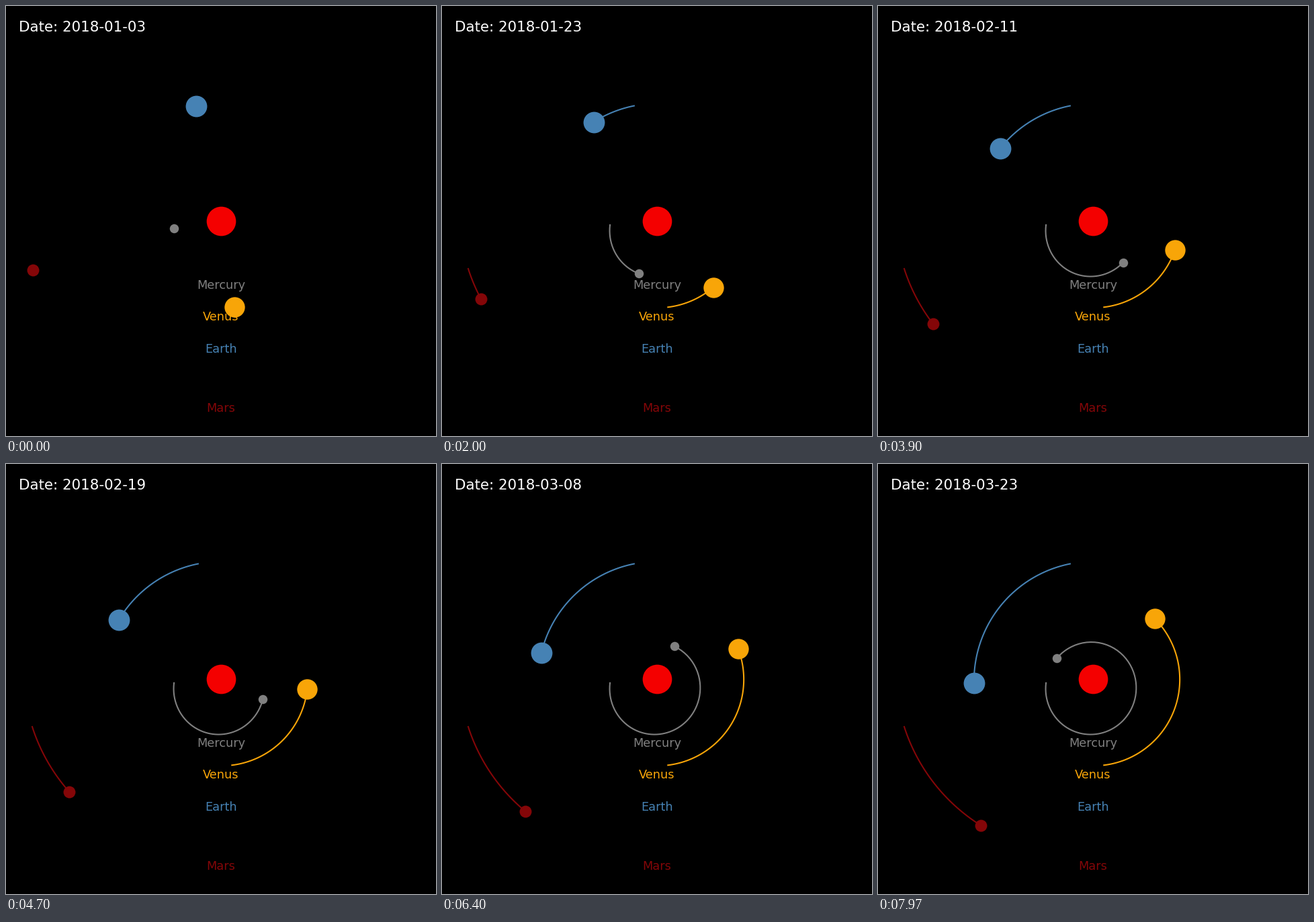
A matplotlib script that plays this animation: 640 px wide and 640 px high, repeating every 8000 ms.

```python
import numpy as np
import matplotlib.pyplot as plt
from matplotlib.animation import FuncAnimation

DAYS = 80
START = np.datetime64("2018-01-03")


def orbit(days, axis, ecc, lon, peri):
    """Kepler orbit seen from above, in AU; lon is the mean longitude on day 0."""
    rate = 0.98561 / axis ** 1.5  # third law, degrees per day
    mean = np.radians(lon + rate * days - peri)
    anomaly = mean
    for _ in range(20):
        anomaly = mean + ecc * np.sin(anomaly)
    x = axis * (np.cos(anomaly) - ecc)
    y = axis * np.sqrt(1 - ecc ** 2) * np.sin(anomaly)
    turn = np.radians(peri)
    return (x * np.cos(turn) - y * np.sin(turn),
            x * np.sin(turn) + y * np.cos(turn))


plt.rcParams["font.family"] = "DejaVu Sans"
fig = plt.figure(figsize=(8, 8), dpi=80, facecolor="black")
ax = fig.add_axes([0, 0, 1, 1], xlim=(-1.8, 1.8), ylim=(-1.8, 1.8))
ax.axis("off")


def dot(x, y, diameter, color):
    return ax.scatter([x], [y], s=diameter ** 2, color=color, lw=0, zorder=10)


def add_planet(name, color, size, label_y, **elements):
    xs, ys = orbit(np.arange(-1, DAYS), **elements)
    trail, = ax.plot([], [], color=color, lw=1.87)
    ax.text(0, -label_y, name, color=color, fontsize=16, ha="center")
    return xs, ys, trail, dot(xs[1], ys[1], 2 + size * 80 / 3, color)


dot(0, 0, 39.3, "#f40000")
date = ax.text(0.03, 0.94, "", color="white", fontsize=19.2,
               transform=ax.transAxes)
planets = [
    add_planet("Mercury", "gray", 0.38, 0.57,
               axis=0.3871, ecc=0.2056, lon=165.5, peri=77.5),
    add_planet("Venus", "#f8a508", 0.95, 0.83,
               axis=0.7233, ecc=0.0068, lon=278.4, peri=131.6),
    add_planet("Earth", "steelblue", 1, 1.1,
               axis=1, ecc=0.0167, lon=102.3, peri=102.9),
    add_planet("Mars", "#840608", 0.53, 1.6,
               axis=1.5237, ecc=0.0934, lon=201.7, peri=336.1),
]


def update(day):
    date.set_text(f"Date: {START + day}")
    for xs, ys, trail, marker in planets:
        trail.set_data(xs[:day + 2], ys[:day + 2])
        marker.set_offsets([[xs[day + 1], ys[day + 1]]])
    return []


anim = FuncAnimation(fig, update, frames=DAYS, interval=100,
                     init_func=lambda: update(0), repeat=True, repeat_delay=0)
plt.show()
```
